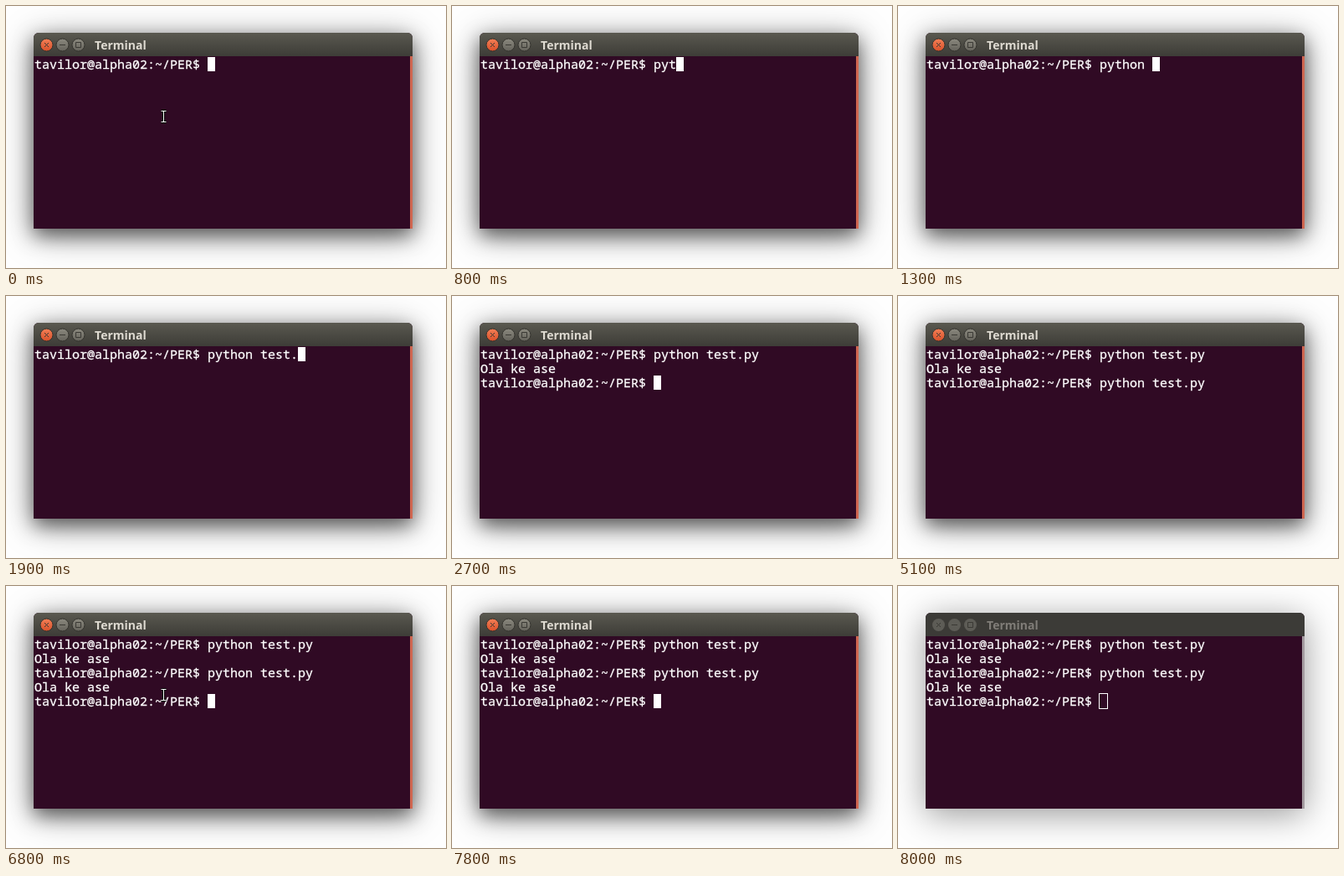
These frames come from a looping animation (526x313 px, 8300 ms). An HTML page:

```html
<!DOCTYPE html>
<html lang="en">
<head>
<meta charset="utf-8">
<title>Terminal</title>
<style>
  html, body { margin: 0; width: 100%; height: 100%; overflow: hidden; background: #fefefe; }
  #stage { position: relative; width: 526px; height: 313px; overflow: hidden; }
  #stage * { position: absolute; box-sizing: border-box; }
  #window {
    --haze: 0 7px 40px rgba(0, 0, 0, .4);
    left: 33px; top: 32px; width: 453px; height: 234px;
    border-radius: 6px 6px 0 0; background: #300a24;
    box-shadow: var(--haze), 0 8px 22px rgba(0, 0, 0, .5);
  }
  #bar {
    width: 100%; height: 28px; border-radius: 6px 6px 0 0;
    background: linear-gradient(#5a5950, #3d3c37);
  }
  #title {
    left: 73px; top: 5px; color: #dfdbd2; white-space: pre;
    font: bold 14px/20px "Open Sans", "Noto Sans", sans-serif;
  }
  #strip { right: 0; top: 28px; width: 3px; height: 206px; background: #cf6650; }
  #buttons { left: 0; top: 0; }
  #buttons circle { fill: url(#grey); stroke: #33322d; }
  #buttons .close { fill: url(#orange); }
  #buttons path { fill: none; stroke: #3a3934; }
  #text {
    left: 34px; top: 61px; margin: 0; color: #fff; white-space: pre;
    font: 15px/17px "Noto Sans Mono", "DejaVu Sans Mono", monospace;
    -webkit-text-stroke: .3px #fff;
  }
  #caret { width: 9px; height: 17px; background: #fff; }
  #pointer { left: 0; top: 0; overflow: visible; }

  .idle #window { box-shadow: var(--haze); }
  .idle #bar { background: #3c3b37; }
  .idle #title { color: #807d78; }
  .idle #strip { background: #a39a9f; }
  .idle #buttons circle { fill: #5d5c56; stroke: none; }
  .idle #caret { width: 11px; height: 19px; margin: -1px; background: none; border: 1px solid #fff; }
</style>
</head>
<body>
<div id="stage">
  <div id="window">
    <div id="bar"></div>
    <svg id="buttons" width="70" height="28">
      <linearGradient id="grey" x2="0" y2="1">
        <stop stop-color="#8a887e"/><stop offset="1" stop-color="#65635b"/>
      </linearGradient>
      <linearGradient id="orange" x2="0" y2="1">
        <stop stop-color="#f27f56"/><stop offset="1" stop-color="#d9502a"/>
      </linearGradient>
      <circle class="close" cx="15.5" cy="14.5" r="7.5"/>
      <circle cx="34.5" cy="14.5" r="7.5"/>
      <circle cx="53.5" cy="14.5" r="7.5"/>
      <path d="M13 12l5 5m0-5l-5 5M31 14.5h7M50.5 11.5h6v6h-6z"/>
    </svg>
    <div id="title">Terminal</div>
    <div id="strip"></div>
  </div>
  <pre id="text"></pre>
  <div id="caret"></div>
  <svg id="pointer" width="1" height="1">
    <g id="beam" fill="none">
      <path d="M-3 -6.5h6M0 -6.5v13M-3 6.5h6" stroke="#000" stroke-width="3"/>
      <path d="M-3 -6.5h6M0 -6.5v13M-3 6.5h6" stroke="#fff"/>
    </g>
    <path id="arrow" d="M0 0v15l3.5-3.3 2.3 5.3 2.5-1.1-2.3-5.2h4.8z" fill="#fff" stroke="#000"/>
  </svg>
</div>
<script>
const LOOP = 8300;
const CELL = { x: 34, y: 61, w: 9, h: 17 };
const PROMPT = 'tavilor@alpha02:~/PER$ ';
const COMMAND = 'python test.py';
const OUTPUT = 'Ola ke ase';

const keyTimes = [400, 500, 800, 900, 1000, 1100, 1300, 1400, 1500, 1600, 1800, 1900, 2100, 2200];
const caretOff = [[3300, 3900], [5100, 5400], [6000, 6600], [7200, 7800]];
const RUN = 2700, RECALL = 4500, RERUN = 5500, BLUR = 8000;
const HIDE = 300, LEAVE = 6800, GONE = 7500, STEP = 100;

const el = id => document.getElementById(id);
const show = (node, on) => { node.style.visibility = on ? 'visible' : 'hidden'; };

function linesAt(t) {
  const typed = COMMAND.slice(0, keyTimes.filter(k => k <= t).length);
  const lines = [PROMPT + typed];
  if (t >= RUN) lines.push(OUTPUT, PROMPT + (t >= RECALL ? COMMAND : ''));
  if (t >= RERUN) lines.push(OUTPUT, PROMPT);
  return lines;
}

// The pointer rests, then speeds up towards the top edge.
function pointerAt(t) {
  if (t < HIDE) return [188.5, 132];
  if (t < LEAVE || t >= GONE) return null;
  const p = Math.floor((t - LEAVE) / STEP) / 6;
  return [188.5 - 58 * p ** 1.8, 130 - 128 * p ** 1.4];
}

function render(t) {
  const lines = linesAt(t);
  const row = lines.length - 1;
  el('text').textContent = lines.join('\n');

  const caret = el('caret');
  caret.style.left = CELL.x + lines[row].length * CELL.w + 'px';
  caret.style.top = CELL.y + row * CELL.h + 'px';
  show(caret, !caretOff.some(([from, to]) => t >= from && t < to));

  const spot = pointerAt(t);
  const inText = spot && spot[1] > 60;
  show(el('beam'), inText);
  show(el('arrow'), spot && !inText);
  if (spot) el('pointer').style.transform = `translate(${spot[0]}px, ${spot[1]}px)`;

  el('stage').classList.toggle('idle', t >= BLUR);
}

const start = performance.now();
function tick() {
  render((performance.now() - start) % LOOP);
  requestAnimationFrame(tick);
}
tick();
</script>
</body>
</html>
```
